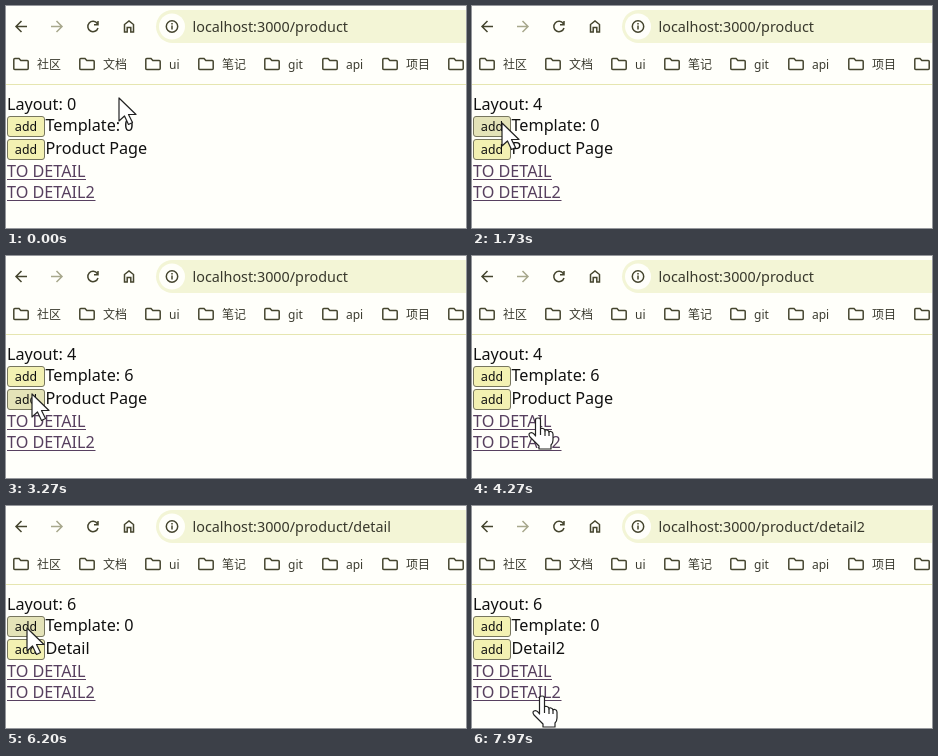
Write an HTML page that moves like this. It is 460 px wide and 222 px high and loops after 8000 ms.

```html
<!DOCTYPE html>
<html lang="zh">
<head>
<meta charset="utf-8">
<title>Layout and template</title>
<style>
html, body { margin: 0; width: 100%; height: 100%; overflow: hidden; background: #fffffa; }
svg { display: block; width: 460px; height: 222px; }
text { font-family: "Noto Sans", "Noto Sans CJK SC", sans-serif; font-size: 16.2px; fill: #111; white-space: pre; }
#url { font-size: 14.35px; fill: #38382c; }
.mark text { font-size: 12px; fill: #3c3c30; }
.mark path, .icon { fill: none; stroke: #45452e; stroke-width: 1.5; }
.button rect { stroke: #77765f; }
.button text { font: 12.5px "Noto Sans Mono", monospace; }
.link text { fill: #57405f; }
.link path { stroke: #57405f; }
.cursor { fill: #fff; stroke: #222; stroke-width: 1.2; stroke-linejoin: round; }
</style>
</head>
<body>
<svg id="stage" viewBox="0 0 460 222">
  <rect width="460" height="222" fill="#fffffa"/>
  <path d="M460 4H166.500a16.500 16.500 0 0 0 0 33H460z" fill="#f3f5d6"/>
  <circle cx="166" cy="20.500" r="13" fill="#fffffa"/>
  <g class="icon">
    <path d="M21 20.500H10M15.500 15L10 20.500L15.500 26"/>
    <path d="M45 20.500H56M50.500 15L56 20.500L50.500 26" stroke="#a8a88c"/>
    <path d="M91.300 17.500A5.200 5.200 0 1 0 92 22M92 15V18.800H88"/>
    <path d="M118.500 18.500L123 15L127.500 18.500V26H124.800V21.500H121.200V26H118.500Z"/>
    <circle cx="166" cy="20.500" r="5.700"/>
    <path d="M166 19.500V23.500M166 17V18.500"/>
  </g>
  <text id="url" x="186.500" y="25.500"></text>
  <g id="marks"></g>
  <path d="M0 78.500H460" stroke="#e6e6b0"/>
  <text id="layout" x="1" y="104"></text>
  <text id="template" x="39.500" y="125"></text>
  <text id="page" x="39.500" y="148"></text>
  <g id="controls"></g>
  <g id="pointer">
    <path class="cursor" id="arrow" d="M0 0V23L5.500 18L9.500 26.500L13.500 24.500L9.500 16.500H17Z"/>
    <g class="cursor" id="hand">
      <path d="M-2.500 2Q-2.500 0 0 0T2.500 2V11Q2.500 10 5 10.500Q7 11 7 13Q7 11.500 9 12Q11 12.500 11 14.500Q11 13 13 13.500Q15 14 15 16V22Q15 25 13 27V31H1V28L-8 19Q-10 16 -8 15Q-6 14 -4 16L-2.500 18Z"/>
      <path d="M2.500 11V17M7 13V18M11 14.500V18" fill="none"/>
    </g>
    <path id="beam" d="M-5 -11H-2L0 -10L2 -11H5M0 -10V10M-5 11H-2L0 10L2 11H5" fill="none" stroke="#111" stroke-width="1.800"/>
  </g>
</svg>
<script>
const LOOP = 8000, PRESS = 80;
const $ = id => document.getElementById(id);

const bookmarks = [[7, '社区'], [73, '文档'], [139, 'ui'], [192, '笔记'],
  [258, 'git'], [316, 'api'], [376, '项目'], [442, '']];
$('marks').innerHTML = bookmarks.map(([x, label]) => `
  <g class="mark" transform="translate(${x} 0)">
    <path d="M.8 53.500Q.8 52.500 1.800 52.500H6L7.800 54.500H14.200Q15.200 54.500 15.200 55.500V62.500Q15.200 63.500 14.200 63.500H1.800Q.8 63.500 .8 62.500Z"/>
    <text x="24" y="63">${label}</text>
  </g>`).join('');

const button = (id, y) => `<g class="button">
  <rect id="${id}" x="1.500" y="${y}.500" width="37" height="20" rx="2.500"/>
  <text x="8.500" y="${y + 15}">add</text></g>`;
const link = (label, y, width) => `<g class="link">
  <text x="1" y="${y}">${label}</text><path d="M1 ${y + 2}.500H${width}"/></g>`;
$('controls').innerHTML = button('layoutAdd', 110) + button('templateAdd', 133) +
  link('TO DETAIL', 171, 80) + link('TO DETAIL2', 192, 89.5);

// Pointer stops: time, x, y
const path = [
  [0, 113, 92], [250, 113, 92], [900, 30, 117], [1750, 30, 117],
  [2050, 26, 138], [3450, 26, 138], [4150, 66, 162], [4750, 66, 162],
  [5300, 44, 132], [5470, 44, 132], [5800, 21, 122], [6500, 21, 122],
  [7250, 70, 190], [LOOP, 70, 190]
];
const layoutClicks = [1200, 1340, 1480, 1620, 5980, 6140];
const templateClicks = [2180, 2310, 2440, 2700, 2960, 3220];
const routes = [
  [0, 'product', 'Product Page'],
  [4450, 'product/detail', 'Detail'],
  [7560, 'product/detail2', 'Detail2']
];

// Topmost areas first: left, top, right, bottom, cursor, button
const areas = [
  [1, 110, 39, 131, 'arrow', 'layoutAdd'],
  [1, 133, 39, 154, 'arrow', 'templateAdd'],
  [1, 155, 80, 176, 'hand'],
  [1, 176, 90, 198, 'hand'],
  [1, 89, 71, 109, 'beam'],
  [39, 110, 127, 132, 'beam'],
  [39, 132, 84, 154, 'beam']
];

function pointerAt(t) {
  const i = path.findIndex(stop => stop[0] > t);
  const [t0, x0, y0] = path[i - 1], [t1, x1, y1] = path[i];
  const p = (t - t0) / (t1 - t0), e = p * p * (3 - 2 * p);
  return [x0 + (x1 - x0) * e, y0 + (y1 - y0) * e];
}

const countClicks = (clicks, t) => clicks.filter(c => c <= t).length;

function paintButton(id, hovered, clicks, t) {
  const pressed = clicks.some(c => t >= c - PRESS && t < c);
  $(id).style.fill = pressed ? '#f8f6bf' : hovered ? '#e4e3b8' : '#f3f1b2';
}

function render(t) {
  const [x, y] = pointerAt(t);
  const area = areas.find(([l, top, r, b]) => x >= l && x <= r && y >= top && y <= b) || [];
  const cursor = area[4] || 'arrow', hovered = area[5];
  const [since, address, title] = routes.filter(r => r[0] <= t).pop();

  $('url').textContent = 'localhost:3000/' + address;
  $('page').textContent = title;
  $('layout').textContent = 'Layout: ' + countClicks(layoutClicks, t);
  $('template').textContent = 'Template: ' + countClicks(templateClicks.filter(c => c > since), t);
  paintButton('layoutAdd', hovered === 'layoutAdd', layoutClicks, t);
  paintButton('templateAdd', hovered === 'templateAdd', templateClicks, t);

  for (const id of ['arrow', 'hand', 'beam']) $(id).style.display = id === cursor ? '' : 'none';
  $('pointer').setAttribute('transform', `translate(${x.toFixed(1)} ${y.toFixed(1)})`);
}

const start = performance.now();
function frame() {
  render((performance.now() - start) % LOOP);
  requestAnimationFrame(frame);
}
frame();
</script>
</body>
</html>
```
